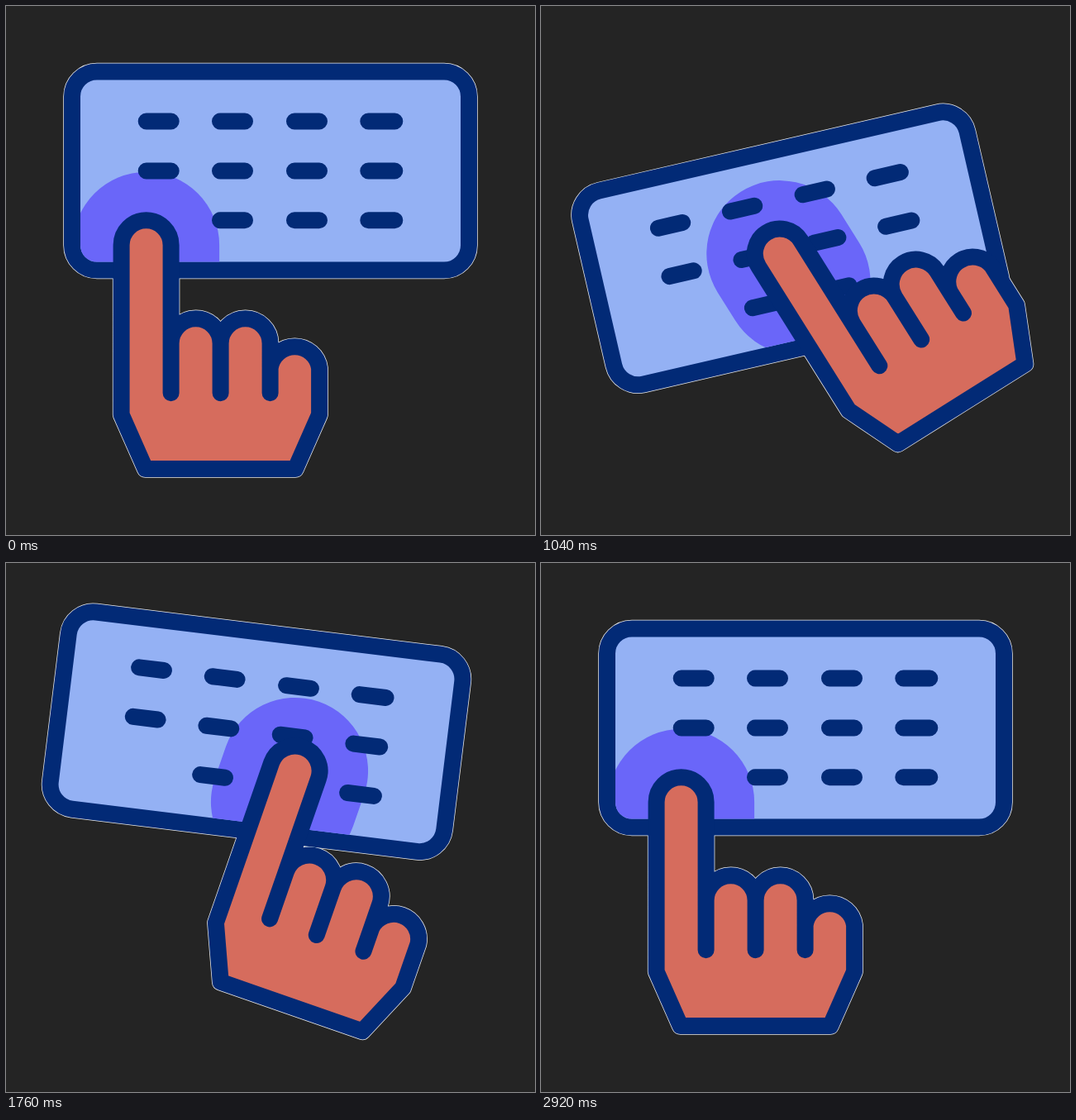
An HTML page that plays this animation: 640 by 640 pixels, repeating every 3 s.

```html
<!DOCTYPE html>
<html lang="en">
<head>
<meta charset="utf-8">
<title>Keypad</title>
<style>
  html, body { margin: 0; width: 100%; height: 100%; overflow: hidden; background: #242424; }
  svg { display: block; width: 100%; height: 100%; }
  .line { stroke: #022a76; stroke-width: 20; stroke-linecap: round; stroke-linejoin: round; }
  .edge { fill: none; stroke: #fff; stroke-opacity: .9; stroke-width: 21.5; stroke-linecap: round; stroke-linejoin: round; }
</style>
</head>
<body>
<svg viewBox="0 0 640 640">
  <defs>
    <clipPath id="inside"><rect x="-230" y="-110" width="460" height="220" rx="20"/></clipPath>
    <rect id="panel" x="-240" y="-120" width="480" height="240" rx="30"/>
    <path id="fist" d="M-1 270.7L-30 205V0A30 30 0 0 1 30 0V119A30 30 0 0 1 90 119A30 30 0 0 1 150 119V149A30 30 0 0 1 209.5 149V205L180.5 270.7Z
      M30 119V179M90 119V179M150 149V179"/>
  </defs>
  <g id="card">
    <use href="#panel" class="edge"/>
    <g class="hand"><use href="#fist" class="edge"/></g>
    <use href="#panel" class="line" fill="#94b1f4"/>
    <g clip-path="url(#inside)">
      <g class="hand"><rect x="-88.5" y="-88.5" width="177" height="217" rx="88.5" fill="#6a66f9"/></g>
    </g>
    <path id="keys" class="line" fill="none"/>
    <g class="hand"><use href="#fist" class="line" fill="#d66c5d"/></g>
  </g>
</svg>
<script>
const LOOP = 3000;

function bezier(x1, y1, x2, y2) {
  const at = (a, b, s) => 3 * a * s * (1 - s) ** 2 + 3 * b * s * s * (1 - s) + s ** 3;
  return u => {
    let lo = 0, hi = 1;
    for (let i = 0; i < 24; i++) {
      const mid = (lo + hi) / 2;
      if (at(x1, x2, mid) < u) lo = mid; else hi = mid;
    }
    return at(y1, y2, lo);
  };
}

const linear = u => u;
const ease = bezier(.25, .1, .25, 1);
const inOut = bezier(.42, 0, .58, 1);
const steep = bezier(.75, 0, .25, 1);
const back = bezier(.35, .1, .6, 1);

// Each track: start value, then moves of [from ms, to ms, value, easing].
const card = {
  x: [320, [222, 613, 301.9, inOut], [1240, 1360, 299.2, linear], [1360, 1640, 303, inOut], [2440, 2870, 320, ease]],
  y: [199.5, [222, 613, 293.3, inOut], [1240, 1633, 204.2, ease], [2440, 2870, 199.5, ease]],
  turn: [0, [216, 607, -13, inOut], [1240, 1716, 7, ease], [2440, 2870, 0, ease]]
};
const hand = {
  x: [-150.4, [270, 680, -14.2, inOut], [1190, 2360, 132, steep], [2440, 2920, -150.4, back]],
  y: [89.8, [130, 390, -3.6, ease], [400, 690, 3.2, inOut], [1190, 2360, 87.2, steep], [2440, 2920, 89.8, back]],
  turn: [0, [130, 390, -19.1, ease], [1165, 2350, 42, steep], [2440, 2920, 0, back]]
};

function value([start, ...moves], t) {
  let v = start;
  for (const [from, to, end, curve] of moves) {
    if (t <= from) break;
    v = t >= to ? end : v + (end - v) * curve((t - from) / (to - from));
  }
  return v;
}

const pose = (part, t) =>
  `translate(${value(part.x, t)} ${value(part.y, t)}) rotate(${value(part.turn, t)})`;

let keys = "";
[-60, 0, 59.8].forEach((y, row) => {
  [-135.3, -46, 44, 134.3].forEach((x, col) => {
    const half = col === 3 ? 16 : 15;
    if (row < 2 || col > 0) keys += `M${x - half} ${y}h${half * 2}`;
  });
});
document.getElementById("keys").setAttribute("d", keys);

const cardNode = document.getElementById("card");
const handNodes = document.querySelectorAll(".hand");

function draw(now) {
  const t = now % LOOP;
  cardNode.setAttribute("transform", pose(card, t));
  const place = pose(hand, t);
  handNodes.forEach(node => node.setAttribute("transform", place));
}

draw(0);
const begin = performance.now();
function tick() {
  draw(performance.now() - begin);
  requestAnimationFrame(tick);
}
requestAnimationFrame(tick);
</script>
</body>
</html>
```
